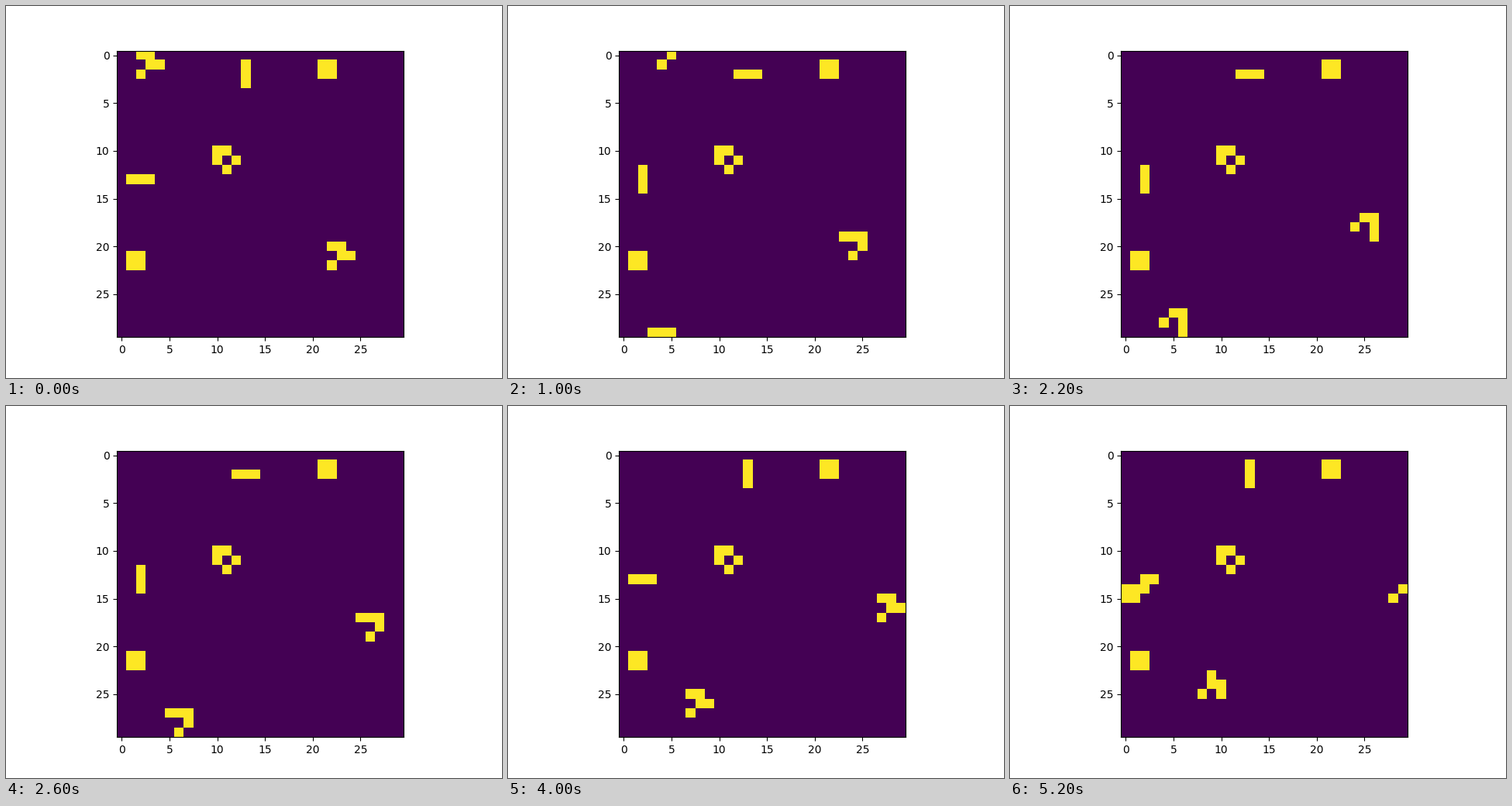
Animation of 640x480 px, one loop 5.4 s. Source, as a matplotlib script:

```python
import matplotlib.pyplot as plt
import numpy as np
from matplotlib.animation import FuncAnimation

SIZE = 30
STEPS = 27
INTERVAL = 200

GLIDER = ["##.", ".##", "#.."]
BOAT = ["##.", "#.#", ".#."]
BLOCK = ["##", "##"]
ROW = ["###"]
COLUMN = ["#", "#", "#"]


def place(grid, shape, row, col):
    for r, line in enumerate(shape):
        for c, mark in enumerate(line):
            grid[row + r, col + c] = mark == "#"


def evolve(grid):
    """One Game of Life step on a torus."""
    near = sum(
        np.roll(grid, (dr, dc), axis=(0, 1))
        for dr in (-1, 0, 1)
        for dc in (-1, 0, 1)
        if dr or dc
    )
    return ((near == 3) | ((grid == 1) & (near == 2))).astype(int)


start = np.zeros((SIZE, SIZE), dtype=int)
place(start, GLIDER, 0, 2)
place(start, GLIDER, 20, 22)
place(start, COLUMN, 1, 13)
place(start, ROW, 13, 1)
place(start, BLOCK, 1, 21)
place(start, BLOCK, 21, 1)
place(start, BOAT, 10, 10)

history = [start]
while len(history) < STEPS:
    history.append(evolve(history[-1]))

fig, ax = plt.subplots(figsize=(6.4, 4.8), dpi=100)
image = ax.imshow(start, cmap="viridis", vmin=0, vmax=1, interpolation="nearest")


def update(step):
    image.set_data(history[step])
    return (image,)


anim = FuncAnimation(fig, update, frames=STEPS, interval=INTERVAL, repeat=True)
plt.show()
```
